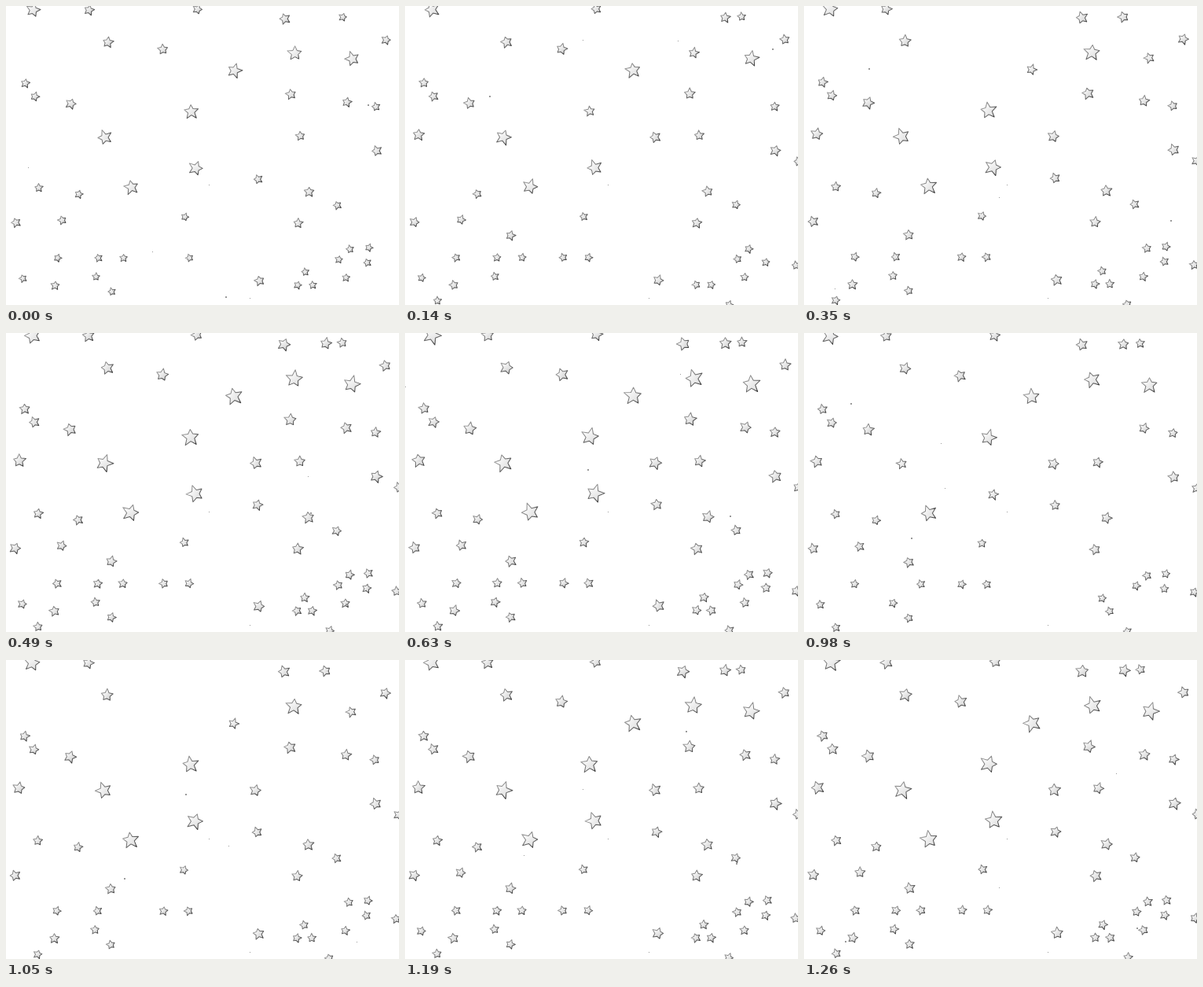
An HTML page with a canvas for the animation above (1.33 s loop, 500x380 px).

```html
<!DOCTYPE html>
<html>
<head>
<meta charset="utf-8">
<title>Twinkling stars</title>
<style>
  html, body { margin: 0; overflow: hidden; background: #fff; }
  canvas { display: block; }
</style>
</head>
<body>
<canvas id="sky" width="500" height="380"></canvas>
<script>
const ctx = document.getElementById('sky').getContext('2d');
const W = 500, H = 380, STEP = 70, STEPS = 19, POSES = 10, TAU = 2 * Math.PI;

const bright = [
  [367, 60], [34, 5], [125, 167], [290, 82], [235, 134], [159, 230], [241, 206], [440, 67]
];

// Small stars, roughly from largest to smallest.
const faint = [
  [17, 164], [129, 46], [354, 16], [82, 124], [362, 112], [199, 55],
  [318, 167], [471, 184], [105, 5], [385, 236], [322, 349], [243, 4],
  [407, 15], [371, 276], [433, 122], [12, 275], [483, 43], [374, 165],
  [134, 292], [36, 115], [320, 220], [24, 98], [62, 355], [71, 272],
  [500, 198], [470, 128], [41, 231], [92, 239], [421, 253], [428, 14],
  [497, 330], [437, 309], [461, 307], [459, 326], [432, 345], [423, 322],
  [412, 380], [227, 268]
];

// A ring of three, two slanted pairs and a staggered row along the bottom.
for (let k = 0; k < 3; k++) {
  const a = k * TAU / 3;
  faint.push([380 + 11 * Math.sin(a), 349 - 11 * Math.cos(a)]);
}
for (let k = 0; k < 2; k++) {
  faint.push([21 + 93 * k, 346 - 2 * k], [41 + 93 * k, 375 - 12 * k]);
}
for (let k = 0; k < 5; k++) {
  faint.push([65 + 42 * k + 10 * (k % 2), 320]);
}

const stars = [
  ...bright.map(([x, y], i) => ({ x, y, radius: 11.2, blink: 2 + i % 4, large: true })),
  ...faint.map(([x, y], i) => ({ x, y, radius: Math.max(6.2, 8.5 - 0.07 * i), blink: i % 6 }))
];

function random(n) {
  const v = Math.sin(n * 12.9898) * 43758.5453;
  return v - Math.floor(v);
}

function starPath(radius, inner, seed) {
  ctx.beginPath();
  for (let k = 0; k < 10; k++) {
    const uneven = 1 + 0.1 * Math.sin(seed + 2.6 * k);
    const r = radius * (k % 2 ? inner : uneven);
    const a = (k / 10 - 0.25) * TAU;
    ctx.lineTo(r * Math.cos(a), r * Math.sin(a));
  }
  ctx.closePath();
}

function shade(r, from, to) {
  const g = ctx.createLinearGradient(-r * 0.6, -r * 0.6, r * 0.7, r * 0.7);
  g.addColorStop(0, from);
  g.addColorStop(1, to);
  return g;
}

// A star vanishes for one pose; a large one only shrinks.
function drawStar({ x, y, radius, blink, large }, seed, pose) {
  const dim = pose === blink;
  if (dim && !large) return;
  const r = radius * (dim ? 0.65 : 0.88 + 0.02 * pose) - 0.4;
  ctx.save();
  ctx.translate(x + 0.6 * Math.cos(pose * TAU / POSES), y + 0.2 - 0.25 * pose);
  ctx.rotate(0.35 * Math.sin(seed * 2.4 + pose * 1.3));
  starPath(r, large ? 0.47 : 0.52, seed + pose);
  ctx.lineJoin = 'round';
  ctx.fillStyle = shade(r, '#fcfcfc', large ? '#dcdcdc' : '#cfcfcf');
  ctx.fill();
  ctx.strokeStyle = shade(r, '#999', '#3c3c3c');
  ctx.stroke();
  ctx.restore();
}

function speck(x, y, size) {
  ctx.fillStyle = '#999';
  ctx.fillRect(x, y, size, size);
}

function drawDust(step) {
  speck(258, 227, 1);
  speck(310, 371, 1);
  for (let k = 1; k <= 4; k++) {
    const n = step * 20 + k;
    speck(Math.floor(W * random(n)), Math.floor(H * random(n + 7)), 1 + k % 2);
  }
}

function tick() {
  const step = Math.floor((performance.now() - start) / STEP) % STEPS;
  ctx.fillStyle = '#fff';
  ctx.fillRect(0, 0, W, H);
  stars.forEach((star, seed) => drawStar(star, seed, step % POSES));
  drawDust(step);
  requestAnimationFrame(tick);
}

const start = performance.now();
tick();
</script>
</body>
</html>
```
